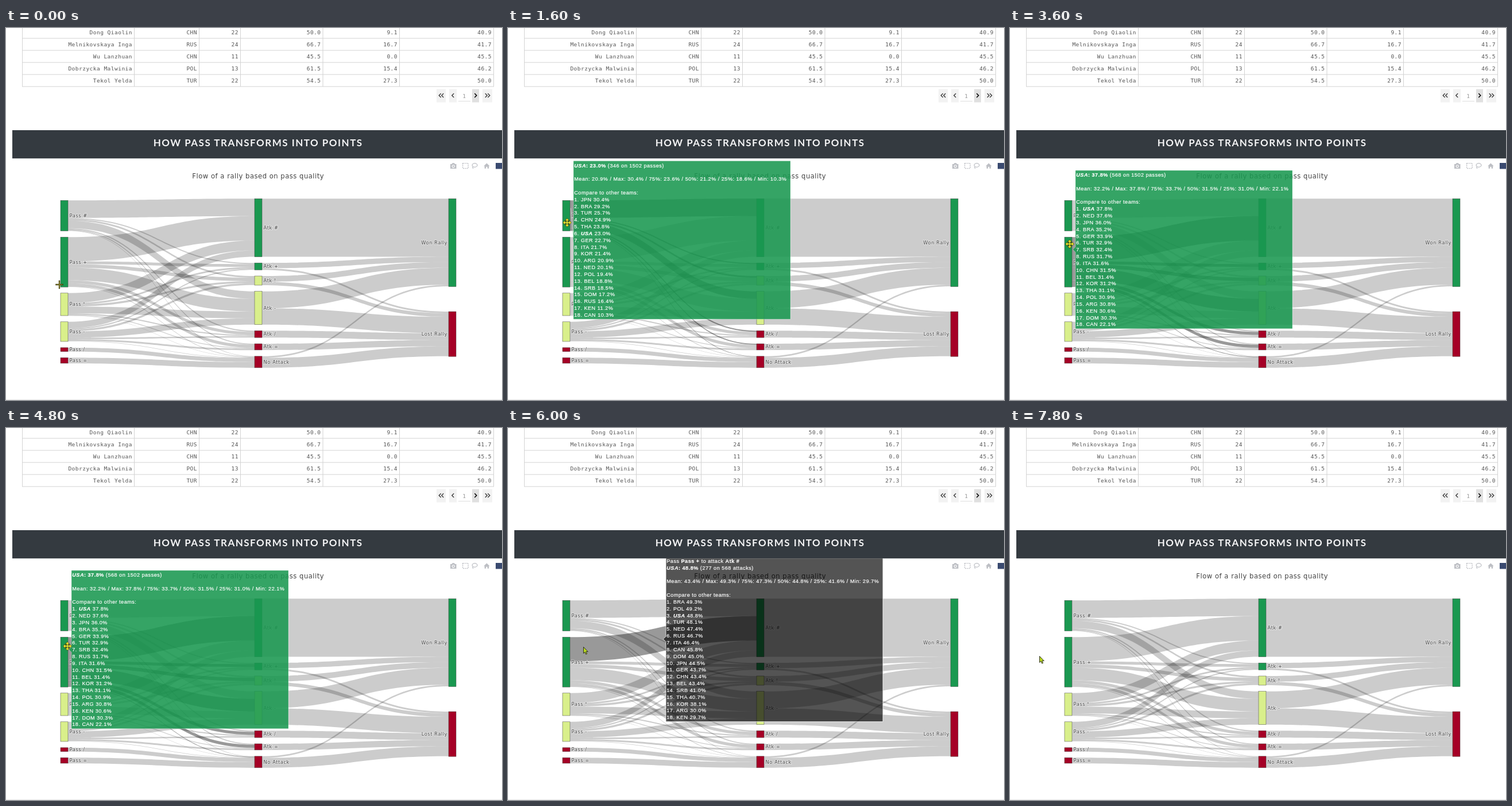
Animation of 864x648 px, one loop 8 s. Source, as an HTML page:

```html
<!DOCTYPE html>
<html lang="en">
<head>
<meta charset="utf-8">
<title>How pass transforms into points</title>
<style>
  html, body { margin: 0; width: 100%; height: 100%; overflow: hidden; background: #fff; }
  svg { display: block; width: 864px; height: 648px; }
  text { white-space: pre; }
  .cell { font: 9.5px "DejaVu Sans Mono", monospace; letter-spacing: .48px; fill: #555; text-anchor: end; }
  .heading { font: 700 17px Lato, sans-serif; letter-spacing: 1.48px; fill: #f4f4f5; text-anchor: middle; }
  .title { font: 11.6px "DejaVu Sans", sans-serif; letter-spacing: .5px; fill: #444; text-anchor: middle; }
  .label { font: 8.4px "DejaVu Sans", sans-serif; letter-spacing: .5px; fill: #444;
           paint-order: stroke; stroke: #fff; stroke-width: 1.6px; stroke-opacity: .6; }
  .tip { font: 9.1px "Liberation Sans", Arial, sans-serif; letter-spacing: .5px; fill: #fff;
         stroke: #fff; stroke-width: .2px; }
  .bold { font-weight: 700; }
  .team { font-weight: 700; font-style: italic; }
</style>
</head>
<body>
<svg id="stage" viewBox="0 0 864 648"></svg>
<script>
const NS = 'http://www.w3.org/2000/svg';
const stage = document.getElementById('stage');
const GREEN = '#1a9850', LIME = '#d9ef8b', RED = '#a50026';

function add(parent, tag, attrs = {}, text) {
  const el = document.createElementNS(NS, tag);
  for (const key in attrs) el.setAttribute(key, attrs[key]);
  if (text !== undefined) el.textContent = text;
  parent.appendChild(el);
  return el;
}
const rect = (parent, x, y, width, height, fill, more) =>
  add(parent, 'rect', { x, y, width, height, fill, ...more });
const path = (parent, d, more) => add(parent, 'path', { d, fill: 'none', ...more });
const write = (parent, cls, x, y, text, more) =>
  add(parent, 'text', { class: cls, x, y, ...more }, text);

// Table and pager
const columns = [223.5, 336.5, 408.5, 552, 685.5, 849.5];
const rows = [
  'Dong Qiaolin|CHN|22|50.0|9.1|40.9',
  'Melnikovskaya Inga|RUS|24|66.7|16.7|41.7',
  'Wu Lanzhuan|CHN|11|45.5|0.0|45.5',
  'Dobrzycka Malwinia|POL|13|61.5|15.4|46.2',
  'Tekol Yelda|TUR|22|54.5|27.3|50.0'
];

function drawTable() {
  const line = { stroke: '#d3d3d3', 'stroke-width': 1 };
  for (const x of [28.5, ...columns]) path(stage, `M${x},0V102`, line);
  rows.forEach((row, i) => {
    path(stage, `M28,${18 + 21 * i}H850`, line);
    row.split('|').forEach((value, c) => write(stage, 'cell', columns[c] - 3.5, 11.4 + 21 * i, value));
  });
}

function chevron(x, dir, color) {
  path(stage, `M${x - 1.7 * dir},114l${3.4 * dir},3.5l${-3.4 * dir},3.5`,
    { stroke: color, 'stroke-width': 1.5 });
}

function drawPager() {
  rect(stage, 750, 106.5, 16, 23, '#f2f2f2');
  rect(stage, 772, 106.5, 13, 23, '#f2f2f2');
  rect(stage, 812, 106.5, 12, 23, '#e0e0e0');
  rect(stage, 830, 106.5, 17, 23, '#f2f2f2');
  for (const x of [756, 760.5, 778.5]) chevron(x, -1, '#444');
  for (const x of [836.5, 841]) chevron(x, 1, '#444');
  chevron(818, 1, '#000');
  write(stage, 'cell', 801.5, 122, '1', { style: 'fill:#999' });
  path(stage, 'M788,127.5H809', { stroke: '#ddd' });
}

function drawHeader() {
  rect(stage, 11, 178, 853, 49.2, '#343a40');
  write(stage, 'heading', 439.2, 206, 'HOW PASS TRANSFORMS INTO POINTS');
  write(stage, 'title', 439.3, 262.4, 'Flow of a rally based on pass quality');
  rect(stage, 0, 646.6, 864, 1.4, '#eee');
}

function drawToolbar() {
  const grey = '#bdbfc4', line = { stroke: grey, 'stroke-width': 1.3 };
  path(stage, 'M774,237h2.5l1-1.7h3.5l1,1.7h2.5v8h-10.5z', { fill: grey });
  add(stage, 'circle', { cx: 779.2, cy: 240.8, r: 2.1, fill: grey, stroke: '#fff', 'stroke-width': 1.1 });
  rect(stage, 795.6, 235.6, 9.5, 9, 'none', { ...line, 'stroke-dasharray': '2 1.2' });
  add(stage, 'ellipse', { cx: 816.5, cy: 239, rx: 4.4, ry: 3.3, fill: 'none', ...line });
  path(stage, 'M813.5,241.5q-1.5,2,.8,3.2', line);
  path(stage, 'M832.2,240.5l5.2,-5l5.2,5h-1.4v4.2h-2.6v-3h-2.4v3h-2.6v-4.2z', { fill: grey });
  rect(stage, 853, 235, 11, 10.5, '#3a4a70');
}

// Flow diagram: each node is [name, column, top, height, colour]
const columnX = [95, 433, 771], NODE_W = 13;
const nodes = [
  ['Pass #', 0, 300.3, 53.2, GREEN], ['Pass +', 0, 364.2, 87, GREEN], ['Pass !', 0, 461.8, 39.2, LIME],
  ['Pass -', 0, 511.8, 34.2, LIME], ['Pass /', 0, 556.8, 6.9, RED], ['Pass =', 0, 574.2, 9.8, RED],
  ['Atk #', 1, 297.3, 101.3, GREEN], ['Atk +', 1, 409.2, 12.2, GREEN], ['Atk !', 1, 432, 16, LIME],
  ['Atk -', 1, 458.7, 58, LIME], ['Atk /', 1, 527.2, 12, RED], ['Atk =', 1, 550, 10.9, RED],
  ['No Attack', 1, 571.8, 20, RED],
  ['Won Rally', 2, 297.3, 153.2, GREEN], ['Lost Rally', 2, 494, 78.2, RED]
].map(([name, col, y, h, color]) => ({ name, col, x: columnX[col], y, h, color, out: y, in: y }));

// Source index, first target index, then the width of each following link
const flows = [
  [0, 6, 30.5, 2, 3, 13, 2.2, 1.8, .8],
  [1, 6, 42.4, 5, 6, 22, 5.2, 5.2, 1],
  [2, 6, 17.2, 3, 3.3, 12, 2.1, 1.3, .5],
  [3, 6, 11, 2.1, 3.5, 11, 2.6, 3, .8],
  [4, 12, 7], [5, 12, 10],
  [6, 13, 101.3], [7, 13, 9.2, 3], [8, 13, 9.9, 6.1], [9, 13, 29.5, 28.5],
  [10, 14, 12], [11, 14, 11], [12, 13, 2.8, 17.2]
];
const links = [];

function drawFlow() {
  for (const [from, first, ...widths] of flows) widths.forEach((w, i) => {
    const a = nodes[from], b = nodes[first + i];
    const x0 = a.x + NODE_W, x1 = b.x, mid = (x0 + x1) / 2;
    const y0 = a.out, y1 = b.in;
    a.out += w;
    b.in += w;
    const el = path(stage, `M${x0},${y0}C${mid},${y0} ${mid},${y1} ${x1},${y1}v${w}` +
      `C${mid},${y1 + w} ${mid},${y0 + w} ${x0},${y0 + w}z`, { fill: '#000', 'fill-opacity': .2 });
    links.push({ from, el });
  });
  for (const n of nodes) {
    rect(stage, n.x, n.y, NODE_W, n.h, n.color, { stroke: '#444', 'stroke-width': .5 });
    const last = n.col === 2;
    write(stage, 'label', last ? n.x - 2 : n.x + 15.6, n.y + n.h / 2 + 3, n.name,
      { 'text-anchor': last ? 'end' : 'start' });
  }
}

// Tooltips
const LINE = 11.84, TIP_W = 378;

function ranking(list) {
  const parts = list.split(' ');
  return parts.filter((_, i) => i % 2 === 0).map((team, i) => [
    `${i + 1}. `, team === 'USA' ? ['team', 'USA'] : team, ` ${parts[2 * i + 1]}%`
  ]);
}

function makeTip({ x, tipY, top, fill, opacity, edge, intro = [], score, count, stats, teams }) {
  const g = add(stage, 'g', { 'clip-path': 'url(#plot)' });
  const [mean, max, q3, q2, q1, min] = stats.split(' ');
  const lines = [
    ...intro,
    [['team', 'USA'], ['bold', `: ${score}%`], ` (${count})`],
    [],
    [`Mean: ${mean}% / Max: ${max}% / 75%: ${q3}% / 50%: ${q2}% / 25%: ${q1}% / Min: ${min}%`],
    [],
    ['Compare to other teams:'],
    ...ranking(teams)
  ];
  const h = lines.length * LINE + 3.4, mid = top + h / 2;
  path(g, `M${x - 4.6},${tipY}L${x},${mid + 4.6}V${top + h}h${TIP_W}V${top}H${x}V${mid - 4.6}z`,
    { fill, 'fill-opacity': opacity, stroke: '#fff', 'stroke-width': .8, 'stroke-opacity': edge });
  lines.forEach((parts, i) => {
    const t = write(g, 'tip', x + 1.3, top + 10.9 + i * LINE);
    for (const part of parts) {
      const [cls, str] = Array.isArray(part) ? part : ['', part];
      add(t, 'tspan', { class: cls }, str);
    }
  });
  return g;
}

function makeTips() {
  const green = { x: 114, fill: GREEN, opacity: .88, edge: .4 };
  return {
    perfect: makeTip({
      ...green, tipY: 313.8, top: 231.6, score: '23.0', count: '346 on 1502 passes',
      stats: '20.9 30.4 23.6 21.2 18.6 10.3',
      teams: 'JPN 30.4 BRA 29.2 TUR 25.7 CHN 24.9 THA 23.8 USA 23.0 GER 22.7 ITA 21.7 KOR 21.4 ' +
        'ARG 20.9 NED 20.1 POL 19.4 BEL 18.8 SRB 18.5 DOM 17.2 RUS 16.4 KEN 11.2 CAN 10.3'
    }),
    good: makeTip({
      ...green, tipY: 385.8, top: 248.1, score: '37.8', count: '568 on 1502 passes',
      stats: '32.2 37.8 33.7 31.5 31.0 22.1',
      teams: 'USA 37.8 NED 37.6 JPN 36.0 BRA 35.2 GER 33.9 TUR 32.9 SRB 32.4 RUS 31.7 ITA 31.6 ' +
        'CHN 31.5 BEL 31.4 KOR 31.2 THA 31.1 POL 30.9 ARG 30.8 KEN 30.6 DOM 30.3 CAN 22.1'
    }),
    link: makeTip({
      x: 275, fill: '#000', opacity: .67, edge: .9, tipY: 367.6, top: 224,
      score: '48.8', count: '277 on 568 attacks',
      intro: [['Pass ', ['bold', 'Pass +'], ' to attack ', ['bold', 'Atk #']]],
      stats: '43.4 49.3 47.3 44.8 41.6 29.7',
      teams: 'BRA 49.3 POL 49.2 USA 48.8 TUR 48.1 NED 47.4 RUS 46.7 ITA 46.4 CAN 45.8 DOM 45.0 ' +
        'JPN 44.5 GER 43.7 CHN 43.4 BEL 43.4 SRB 41.0 THA 40.7 KOR 38.1 ARG 30.0 KEN 29.7'
    })
  };
}

// Pointers
function outlined(d, dark, darkWidth, light, lightWidth) {
  const g = add(stage, 'g');
  path(g, d, { stroke: dark, 'stroke-width': darkWidth, 'stroke-linecap': 'square' });
  path(g, d, { stroke: light, 'stroke-width': lightWidth });
  return g;
}

function makePointers() {
  const cross = outlined('M-5.5,0H5.5M0,-6V6', '#3d3a10', 2.4, '#8f8a28', 1.1);
  const heads = 'M-2,-4L0,-6L2,-4M-2,4L0,6L2,4M-4,-2L-6,0L-4,2M4,-2L6,0L4,2';
  const move = outlined('M-6,0H6M0,-6V6' + heads, '#4a4a10', 2.5, '#f0ea30', 1.4);
  const arrow = add(stage, 'g');
  path(arrow, 'M0,0V11L2.5,8.8L4.2,12.7L6.1,11.9L4.4,8.1H7.8z',
    { fill: '#b9d91f', stroke: '#222', 'stroke-width': .9, 'stroke-linejoin': 'round' });
  return { cross, move, arrow };
}

// Pointer track: [ms, x, y]
const track = [
  [0, 93, 447], [200, 102, 384], [600, 102.5, 367], [800, 103, 351], [1200, 103, 344], [1600, 103, 339],
  [2000, 103, 340], [2200, 103, 349], [2400, 103, 367], [2600, 103, 370], [3400, 103, 375],
  [4200, 107, 380], [4800, 107, 380], [5000, 116, 380], [5400, 131.5, 381.5], [6600, 131.5, 381.5],
  [6800, 123, 384], [7000, 104, 389], [7200, 84, 393], [7800, 51.5, 397.5], [8000, 51.5, 397.5]
];

function pointerAt(t) {
  const i = track.findIndex(key => key[0] > t);
  const [t0, x0, y0] = track[i - 1], [t1, x1, y1] = track[i];
  const k = (t - t0) / (t1 - t0);
  return [x0 + (x1 - x0) * k, y0 + (y1 - y0) * k];
}

function hoverAt(x, y) {
  const node = nodes.findIndex(n => x >= n.x && x <= n.x + NODE_W && y >= n.y && y <= n.y + n.h);
  if (node === 0) return 'perfect';
  if (node === 1) return 'good';
  return x > columnX[0] + NODE_W ? 'link' : 'none';
}

const plot = add(add(stage, 'defs'), 'clipPath', { id: 'plot' });
rect(plot, 0, 227.2, 864, 420, '#000');
drawTable();
drawPager();
drawHeader();
drawToolbar();
drawFlow();
const tips = makeTips();
const pointers = makePointers();
const strongLink = links.find(l => l.from === 1);

function render(time) {
  const t = Math.floor((time % 8000) / 200) * 200;
  const [x, y] = pointerAt(t);
  const hover = hoverAt(x, y);
  for (const key in tips) tips[key].style.display = key === hover ? '' : 'none';

  const source = { perfect: 0, good: 1 }[hover];
  for (const link of links) {
    const strong = link.from === source || (hover === 'link' && link === strongLink);
    link.el.setAttribute('fill-opacity', strong ? .4 : .2);
  }

  const shape = t < 200 ? 'cross' : source !== undefined ? 'move' : 'arrow';
  for (const key in pointers) pointers[key].style.display = key === shape ? '' : 'none';
  pointers[shape].setAttribute('transform', `translate(${x},${y})`);
}

const start = performance.now();
function tick() {
  render(performance.now() - start);
  requestAnimationFrame(tick);
}
tick();
</script>
</body>
</html>
```
